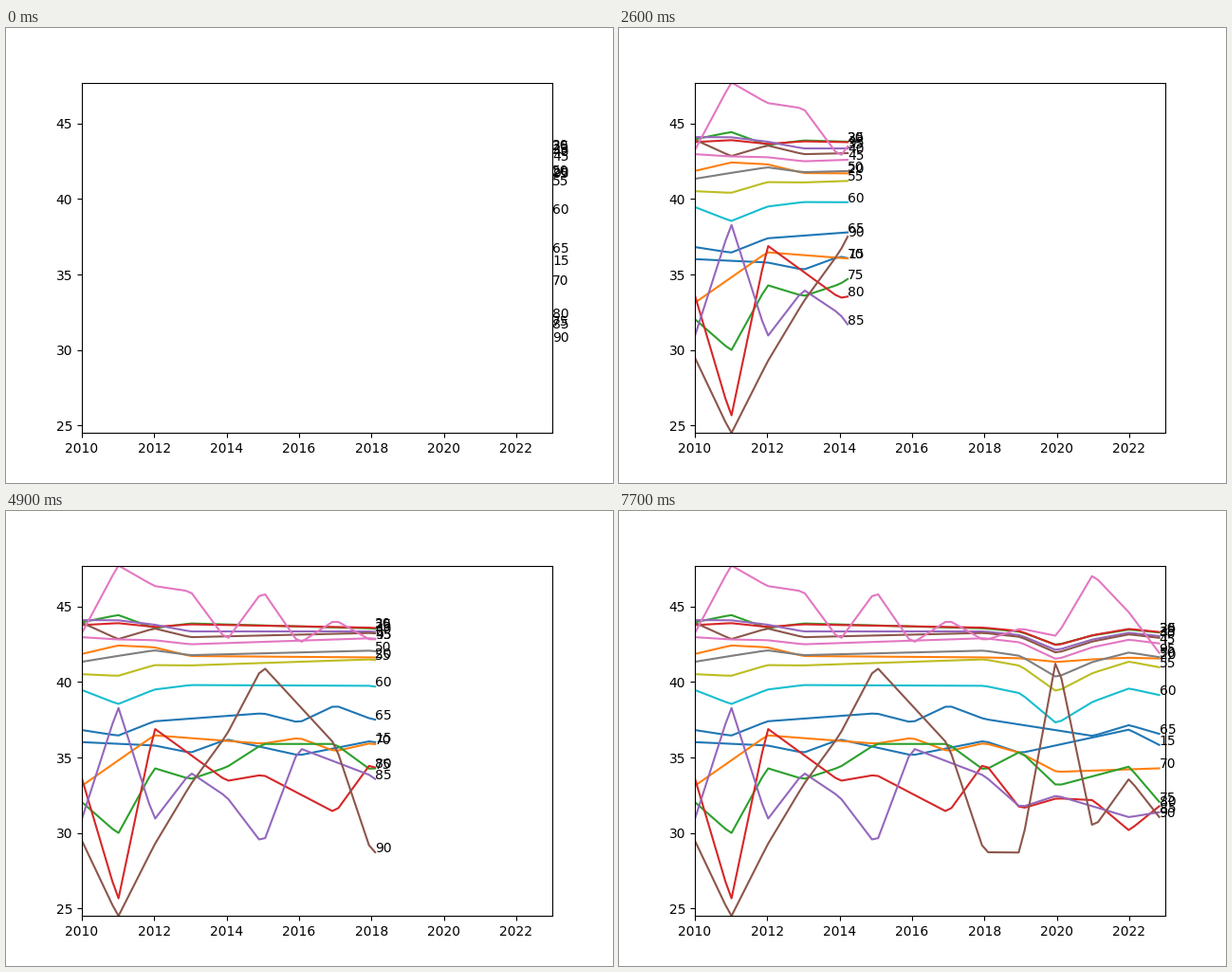
These frames come from a looping animation (640 px wide and 480 px high, 7800 ms). A matplotlib script:

```python
import numpy as np
import matplotlib.pyplot as plt
from matplotlib.animation import FuncAnimation

FRAMES = 78
START, SPAN = 2010, 13
t = np.linspace(0, SPAN, FRAMES)  # years since START

plt.rcParams["font.family"] = "DejaVu Sans"
fig, ax = plt.subplots(figsize=(6.4, 4.8), dpi=100)
ax.set_xlim(START, START + SPAN)
ax.set_ylim(24.51, 47.71)

traces = []


def trace(age, ys):
    line, = ax.plot([], [])
    label = ax.text(START, ys[0], str(age))
    traces.append((line, label, ys))


def bends(age, turns):
    """Straight runs between the turning points {year: value}."""
    trace(age, np.interp(t, list(turns), list(turns.values())))


def calm(age, *levels):
    """A nearly flat line that sags around 2020, deeper with age."""
    base = np.interp(t, (0, 1, 2, 3, 8), levels)
    depth = np.interp(age, (20, 25, 45, 60), (0.3, 1.1, 1.4, 2.5))
    sag = np.interp(t, (8, 9, 10, 11, 12, 13), (0, 0.2, 1, 0.42, 0.07, 0.28))
    trace(age, base - depth * sag)


bends(15, {0: 36.02, 2: 35.8, 3: 35.32, 4: 36.2, 6: 35.15, 8: 36.1, 9: 35.3, 12: 36.85, 13: 35.63})

calm(20, 41.86, 42.42, 42.3, 41.72, 41.63)
calm(25, 43.96, 44.44, 43.57, 43.88, 43.55)
calm(30, 43.77, 43.9, 43.65, 43.82, 43.6)
calm(35, 44.1, 44.09, 43.8, 43.35, 43.35)
calm(40, 43.93, 42.84, 43.55, 42.97, 43.25)
calm(45, 42.97, 42.82, 42.77, 42.5, 42.9)
calm(50, 41.34, 41.73, 42.1, 41.78, 42.08)
calm(55, 40.52, 40.41, 41.12, 41.1, 41.5)
calm(60, 39.47, 38.54, 39.5, 39.8, 39.75)

bends(65, {0: 36.82, 1: 36.45, 2: 37.4, 5: 37.93, 6: 37.32, 7: 38.45, 8: 37.55, 11: 36.43, 12: 37.15, 13: 36.45})
bends(70, {0: 33.13, 2: 36.47, 5: 35.92, 6: 36.3, 7: 35.42, 8: 35.96, 9: 35.3, 10: 34.05, 13: 34.3})
bends(75, {0: 32.05, 1: 29.95, 2: 34.3, 3: 33.57, 4: 34.36, 5: 35.9, 7: 35.9, 8: 34.15,
           9: 35.4, 10: 33.13, 12: 34.4, 13: 31.6})
bends(80, {0: 33.62, 1: 25.53, 2: 36.93, 4: 33.45, 5: 33.86, 7: 31.36, 8: 34.66,
           9: 31.6, 10: 32.3, 11: 32.18, 12: 30.17, 13: 32.1})
bends(85, {0: 30.93, 1: 38.38, 2: 30.88, 3: 34, 4: 32.4, 5: 29.25, 6: 35.63, 8: 33.8,
           9: 31.7, 10: 32.48, 12: 31.05, 13: 31.45})
bends(90, {0: 29.5, 1: 24.45, 2: 29.2, 3: 33.2, 4: 36.5, 5: 41.05, 7: 35.86, 8: 28.73,
           9: 28.71, 10: 41.72, 11: 30.25, 12: 33.6, 13: 30.55})
bends(95, {0: 43.24, 1: 47.73, 2: 46.36, 3: 46, 4: 42.76, 5: 46.03, 6: 42.55, 7: 44.1,
           8: 42.75, 9: 43.54, 10: 43.05, 11: 47.12, 12: 44.6, 13: 41.39})


def update(n):
    # With nothing drawn yet, index -1 parks the labels at the last year.
    for line, label, ys in traces:
        line.set_data(START + t[:n], ys[:n])
        label.set_position((START + t[n - 1], ys[n - 1]))


anim = FuncAnimation(fig, update, frames=FRAMES, interval=100, repeat=True, repeat_delay=0)
plt.show()
```
